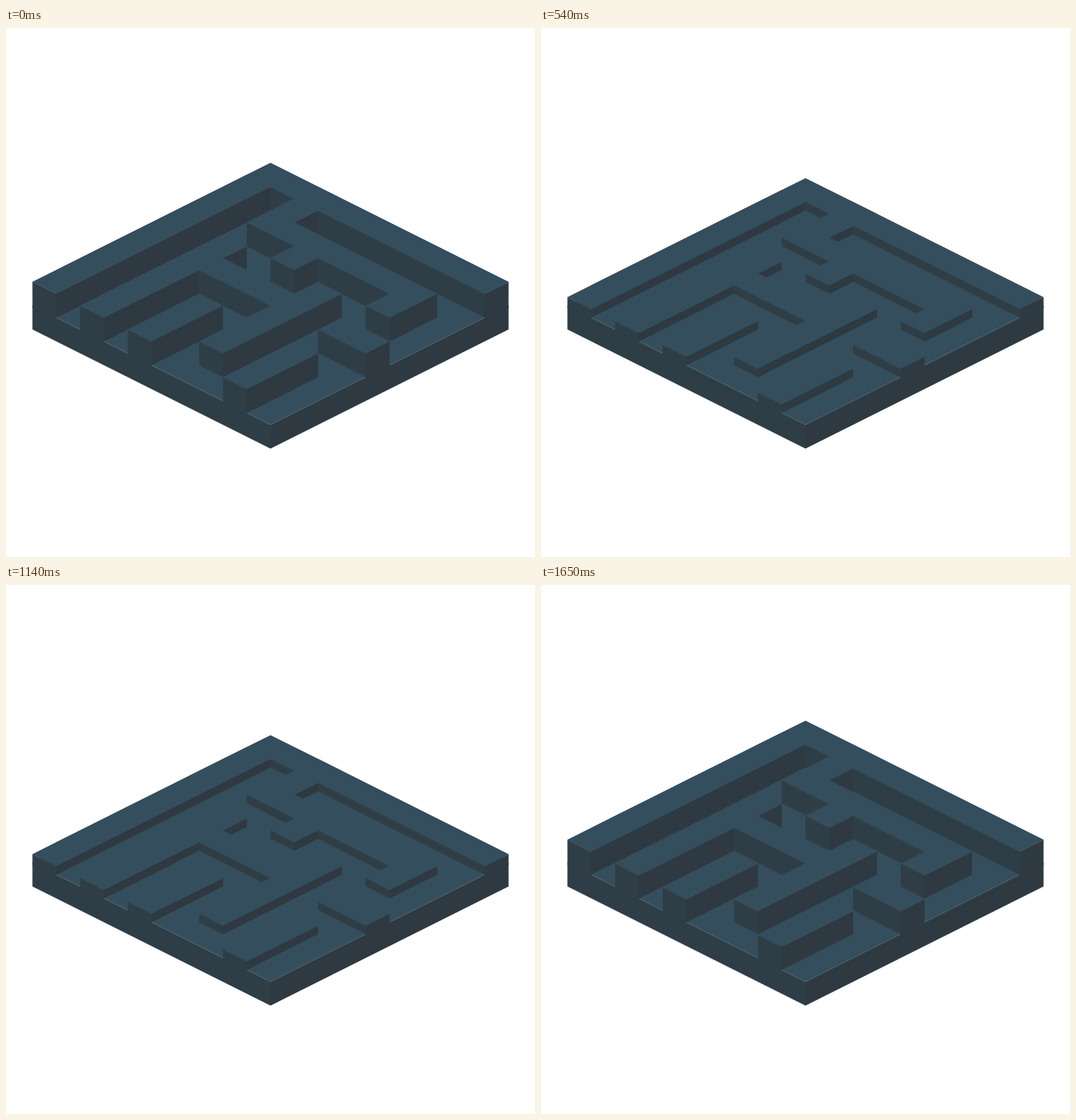
These frames come from a looping animation (748x748 px, 1.68 s). An HTML page with a canvas:

```html
<!DOCTYPE html>
<html lang="en">
<head>
<meta charset="utf-8">
<title>Isometric maze</title>
<style>
  html, body { margin: 0; width: 100%; height: 100%; overflow: hidden; background: #fff; }
  canvas { display: block; width: 100%; height: 100%; }
</style>
</head>
<body>
<canvas id="stage" width="748" height="748"></canvas>
<script>
const ctx = document.getElementById('stage').getContext('2d');

const TOP = '#354e5d', LEFT = '#2f3e46', RIGHT = '#2e3941';
const UNIT = 33.66;           // half width of a tile, also slab and full wall height
const CENTER_X = 374;
const BACK_Y = 224.4;         // back corner of the floor
const STEP_MS = 30, STEPS = 56;

// One string per row, 1 is a wall; columns run down right, rows run down left.
const MAZE = [
  '1111111111',
  '1010000000',
  '1011111110',
  '1000100010',
  '1010001000',
  '1011111011',
  '1010001000',
  '1010101010',
  '1010101010',
  '1010100010'
];
const SIZE = MAZE.length;
const isWall = (col, row) => MAZE[row]?.[col] === '1';
const showsLeft = (col, row) => isWall(col, row) && !isWall(col, row + 1);
const showsRight = (col, row) => isWall(col, row) && !isWall(col + 1, row);

// Back-to-front order
const cells = [];
for (let sum = 0; sum <= 2 * (SIZE - 1); sum++) {
  for (let col = 0; col <= sum; col++) {
    if (isWall(col, sum - col)) cells.push([col, sum - col]);
  }
}

function fill(color, points) {
  ctx.fillStyle = color;
  ctx.beginPath();
  for (const [col, row, z] of points) {
    ctx.lineTo(CENTER_X + (col - row) * UNIT, BACK_Y + (col + row) * UNIT / 2 - z);
  }
  ctx.fill();
}

function topFace(c0, r0, c1, r1, z) {
  fill(TOP, [[c0, r0, z], [c1, r0, z], [c1, r1, z], [c0, r1, z]]);
}

function leftFace(c0, c1, row, low, high) {
  fill(LEFT, [[c0, row, high], [c1, row, high], [c1, row, low], [c0, row, low]]);
}

function rightFace(col, r0, r1, low, high) {
  fill(RIGHT, [[col, r0, high], [col, r1, high], [col, r1, low], [col, r0, low]]);
}

// Faces reach into equal neighbours so that no seams show.
function drawWall(col, row, height) {
  if (showsLeft(col, row)) {
    const end = col + 1 + showsLeft(col + 1, row);
    leftFace(col, end, row + 1, row === SIZE - 1 ? -3 : 0, height);
  }
  if (showsRight(col, row)) {
    const end = row + 1 + showsRight(col, row + 1);
    rightFace(col + 1, row, end, col === SIZE - 1 ? -3 : 0, height);
  }
  topFace(col, row, col + 1 + isWall(col + 1, row), row + 1, height);
  if (isWall(col, row + 1)) topFace(col, row, col + 1, row + 2, height);
}

function draw(height) {
  ctx.fillStyle = '#fff';
  ctx.fillRect(0, 0, 748, 748);
  leftFace(0, SIZE, SIZE, -UNIT, 0);
  rightFace(SIZE, 0, SIZE, -UNIT, 0);
  topFace(0, 0, SIZE, SIZE, 0);
  for (const [col, row] of cells) drawWall(col, row, height);
}

const start = performance.now();
function tick() {
  const step = Math.floor((performance.now() - start) / STEP_MS) % STEPS;
  draw(UNIT * Math.abs(1 - step / (STEPS / 2)));
  requestAnimationFrame(tick);
}
tick();
</script>
</body>
</html>
```
